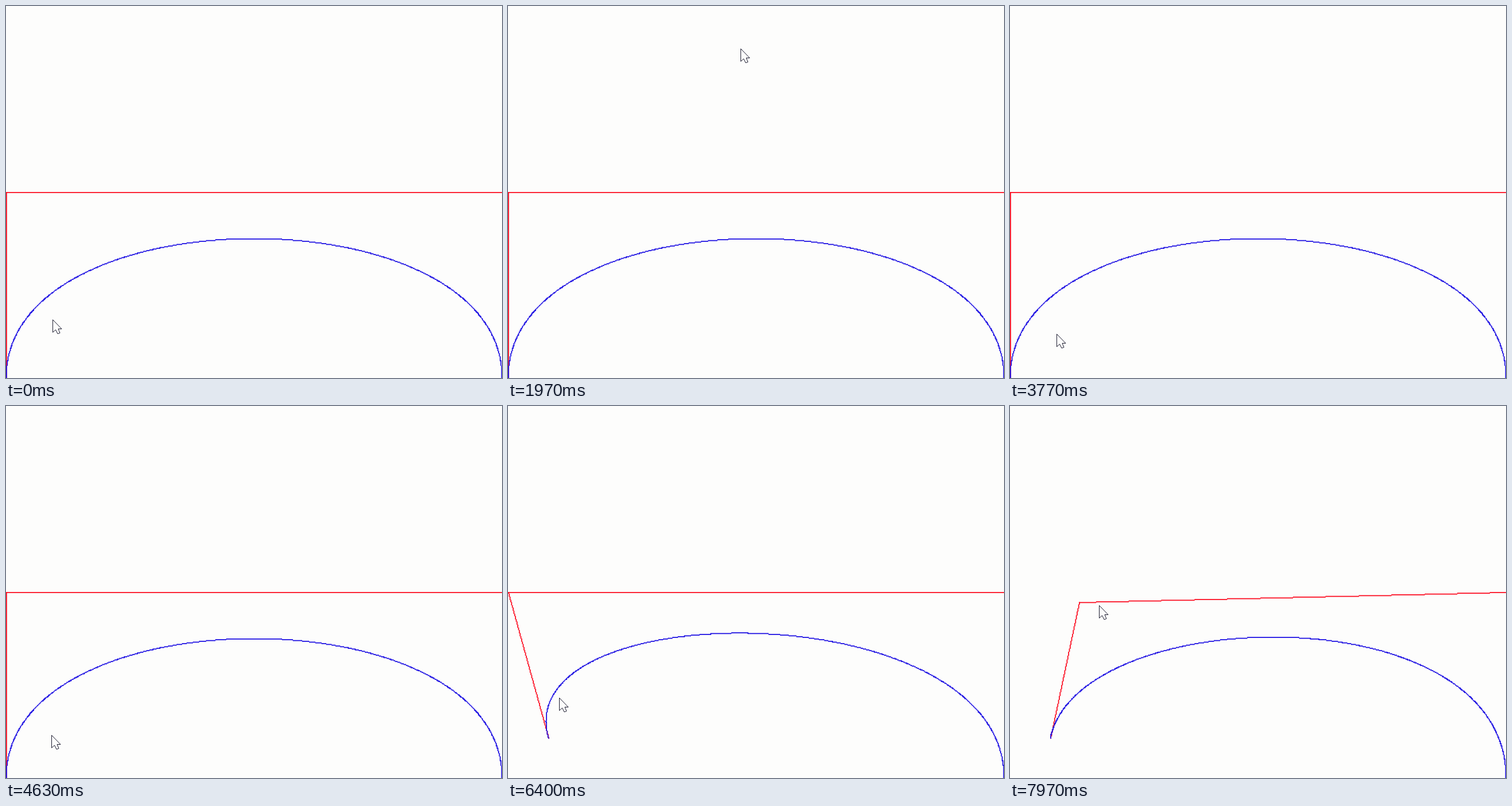
Write an HTML page with a canvas that moves like this. It is 864 px wide and 648 px high and loops after 8 s.

```html
<!DOCTYPE html>
<html lang="en">
<head>
<meta charset="utf-8">
<title>Bezier curve editor</title>
<style>
  html, body { margin: 0; width: 100%; height: 100%; overflow: hidden; background: #fdfdfc; }
  canvas { display: block; }
</style>
</head>
<body>
<canvas id="stage" width="864" height="648"></canvas>
<script>
const W = 864, H = 648, LOOP = 8000;
const CELL = W / 640;   // the curve is plotted on a 640 x 480 grid
const DOT = 1.75;
const PAPER = '#fdfdfc', RED = '#fc0a1e', BLUE = '#1a0ce2', INK = '#1c1c30';
const ctx = document.getElementById('stage').getContext('2d');

// Pointer strokes; it rests between them.
const home = { x: 81, y: 546 };
const strokes = [
  { from: 0,    to: 1150, x: 66,  y: 568 },
  { from: 1220, to: 1630, x: 405, y: 74 },
  { from: 2490, to: 2650, x: 417, y: 30 },
  { from: 2740, to: 3280, x: 81,  y: 571 },
  { from: 4150, to: 4450, x: 79,  y: 573 },
  { from: 4850, to: 5650, x: 149, y: 503 },
  { from: 5950, to: 6400, x: 89,  y: 508 },
  { from: 6400, to: 6850, x: 35,  y: 329 },
  { from: 6980, to: 7470, x: 160, y: 324 },
  { from: 7470, to: 7960, x: 155, y: 347 }
];

// Each control point follows the pointer while it is held.
const startPoint = { x: 0, y: H, grab: 4850, drop: 5650 };
const firstHandle = { x: 0, y: H / 2, grab: 6980, drop: 7960 };
const secondHandle = { x: W, y: H / 2 };
const endPoint = { x: W, y: H };

const clamp = (v, lo, hi) => Math.min(hi, Math.max(lo, v));
const ease = u => u * u * (3 - 2 * u);

function pointerAt(t) {
  let { x, y } = home;
  for (const s of strokes) {
    const e = ease(clamp((t - s.from) / (s.to - s.from), 0, 1));
    x += (s.x - x) * e;
    y += (s.y - y) * e;
  }
  return { x, y };
}

function dragged(point, t) {
  const a = pointerAt(point.grab), b = pointerAt(clamp(t, point.grab, point.drop));
  return { x: point.x + b.x - a.x, y: point.y + b.y - a.y };
}

const toGrid = p => ({ x: Math.round(p.x / CELL), y: Math.round(p.y / CELL) });

function dot(x, y) {
  ctx.rect(Math.floor(x) * CELL, Math.floor(y) * CELL, DOT, DOT);
}

// Plots as one path, so that overlapping dots do not darken.
function plot(color, steps, pointAt) {
  ctx.beginPath();
  for (let i = 0; i <= steps; i++) dot(...pointAt(i / steps));
  ctx.fillStyle = color;
  ctx.fill();
}

function line(a, b) {
  const steps = Math.max(Math.abs(b.x - a.x), Math.abs(b.y - a.y));
  plot(RED, steps, u => [
    Math.round(a.x + (b.x - a.x) * u),
    Math.round(a.y + (b.y - a.y) * u)
  ]);
}

function bezier(a, b, c, d) {
  plot(BLUE, 1000, t => {
    const s = 1 - t;
    const at = k => s ** 3 * a[k] + 3 * s * s * t * b[k] + 3 * s * t * t * c[k] + t ** 3 * d[k];
    return [at('x'), at('y')];
  });
}

const arrow = new Path2D('M0 0V22L5 17.5L8.5 24.5L12.5 23L9.5 16H15.5Z');

function drawPointer({ x, y }) {
  ctx.save();
  ctx.translate(Math.round(x) + 0.5, Math.round(y) + 0.5);
  ctx.fillStyle = PAPER;
  ctx.fill(arrow);
  ctx.strokeStyle = INK;
  ctx.lineWidth = 1;
  ctx.stroke(arrow);
  ctx.restore();
}

function draw(t) {
  const points = [dragged(startPoint, t), dragged(firstHandle, t), secondHandle, endPoint].map(toGrid);
  ctx.fillStyle = PAPER;
  ctx.fillRect(0, 0, W, H);
  for (let i = 0; i < 3; i++) line(points[i], points[i + 1]);
  bezier(...points);
  drawPointer(pointerAt(t));
}

const begin = performance.now();
function frame() {
  draw((performance.now() - begin) % LOOP);
  requestAnimationFrame(frame);
}
frame();
</script>
</body>
</html>
```
